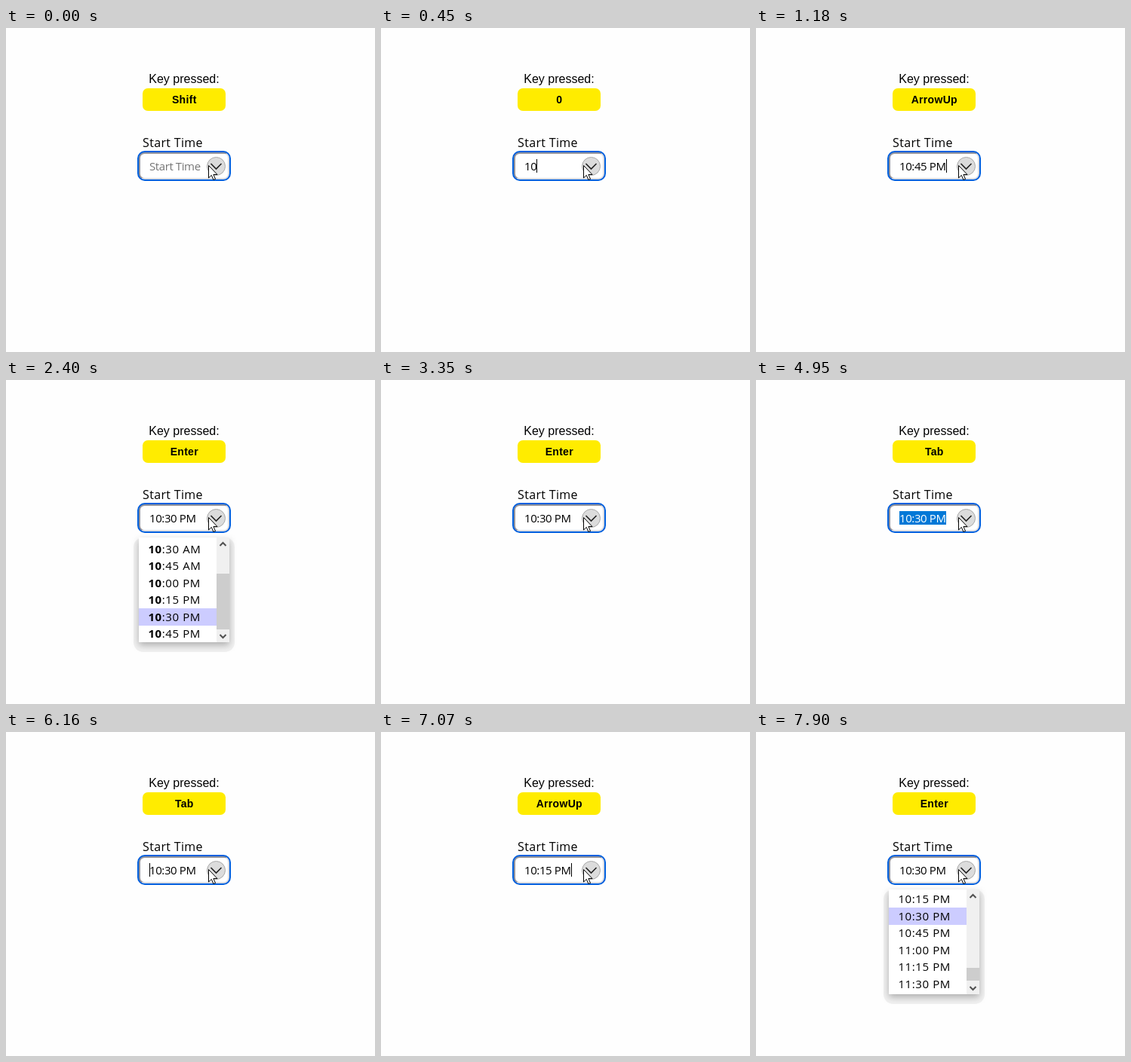
An HTML page for the animation above (8 s loop, 489 by 430 pixels).

```html
<!DOCTYPE html>
<html lang="en">
<head>
<meta charset="utf-8">
<title>Time picker keyboard demo</title>
<style>
  html, body { margin: 0; width: 100%; height: 100%; overflow: hidden; background: #fefefe; }
  svg { display: block; }
  text { font-family: "Open Sans", "Noto Sans", sans-serif; white-space: pre; }
  .sans { font-family: "Liberation Sans", Arial, sans-serif; text-anchor: middle; }
  #key { font-size: 14px; font-weight: bold; letter-spacing: .3px; }
  #value { font-size: 15px; letter-spacing: -.4px; }
  #rows { font-size: 15px; font-weight: 500; letter-spacing: .6px; }
  #panel { filter: drop-shadow(0 4px 5px rgba(0, 0, 0, .28)); }
  .line { fill: none; stroke: #505050; stroke-width: 2; }
</style>
</head>
<body>
<svg width="489" height="430" viewBox="0 0 489 430">
  <defs>
    <linearGradient id="inset" x1="0" y1="0" x2="1" y2="1">
      <stop offset=".5" stop-color="#94949c"/>
      <stop offset=".5" stop-color="#dedee2"/>
    </linearGradient>
    <clipPath id="view"><rect x="176" y="209" width="103" height="139"/></clipPath>
  </defs>

  <text class="sans" x="236" y="73" font-size="16">Key pressed:</text>
  <rect x="181" y="80" width="110" height="30" rx="7" fill="#ffec00"/>
  <text id="key" class="sans" x="236.3" y="100"></text>

  <text x="181" y="158" font-size="16" font-weight="500" letter-spacing=".35">Start Time</text>
  <rect x="176.5" y="165.5" width="119" height="35" rx="7" fill="#fff" stroke="url(#inset)" stroke-width="3"/>
  <rect id="ring" x="175" y="164" width="122" height="38" rx="9" fill="none" stroke="#0060df" stroke-width="2"/>
  <rect id="selection" x="190" y="174" width="62" height="18" fill="#0078d7"/>
  <text id="value" x="190" y="189"></text>
  <rect id="caret" y="174" width="1" height="18"/>
  <circle cx="278.5" cy="183.5" r="12" fill="#dcdcdc" stroke="#a9a9a9"/>
  <path class="line" style="stroke:#222;stroke-width:1.6" d="M271.5 180l7 7 7-7"/>

  <g id="list">
    <rect x="169" y="209" width="134" height="152" rx="13" fill="#f1f1f1"/>
    <rect id="panel" x="176" y="209" width="120" height="139" fill="#fff"/>
    <g id="rows" clip-path="url(#view)"></g>
    <rect x="279" y="209" width="17" height="139" fill="#f0f0f0"/>
    <rect id="thumb" x="279" width="17" fill="#cdcdcd"/>
    <path class="line" d="M283.5 220l4-4 4 4M283.5 338l4 4 4-4"/>
  </g>

  <path d="M268.5 182.5v16.5l3.8-3.6 2.6 6.1 2.6-1.1-2.6-5.9h5.1z" fill="#fff" stroke="#000"/>
</svg>
<script>
const LOOP = 8000, ROW = 22.5;
const $ = id => document.getElementById(id);

// thumb: top and height of the scroll handle
const filtered = {
  rows: ['10:30 AM', '10:45 AM', '10:00 PM', '10:15 PM', '10:30 PM', '10:45 PM'],
  top: 213.3, bold: 2, thumb: [257, 74]
};
const full = {
  rows: ['10:15 PM', '10:30 PM', '10:45 PM', '11:00 PM', '11:15 PM', '11:30 PM'],
  top: 210.8, bold: 0, thumb: [313, 17]
};

// Each step changes part of the state; caret is an x position, 0 hides it.
const steps = [
  [0, { key: 'Shift', value: '', caret: 0, focus: true, selected: false, list: null }],
  [120, { value: '1', caret: 198 }],
  [270, { key: '1' }],
  [360, { value: '10', caret: 206 }],
  [450, { key: '0' }],
  [880, { caret: 0 }],
  [1000, { caret: 190 }],
  [1180, { key: 'ArrowUp', value: '10:45 PM', caret: 252 }],
  [1300, { caret: 190 }],
  [1420, { value: '10:30 PM', caret: 252 }],
  [1910, { caret: 0 }],
  [2400, { key: 'Enter', list: filtered }],
  [2460, { caret: 252 }],
  [2920, { caret: 0 }],
  [3350, { list: null }],
  [3520, { focus: false }],
  [3700, { key: 'Tab' }],
  [4950, { focus: true, selected: true }],
  [6160, { selected: false, caret: 190 }],
  [6320, { key: 'ArrowUp', value: '10:15 PM', caret: 252 }],
  [6570, { caret: 0 }],
  [7070, { caret: 252 }],
  [7330, { key: 'ArrowDown', value: '10:30 PM' }],
  [7650, { caret: 0 }],
  [7900, { key: 'Enter', list: full }]
];

const show = (id, on) => $(id).setAttribute('visibility', on ? 'visible' : 'hidden');

function drawList({ rows, top, bold, thumb }, value) {
  $('rows').innerHTML = rows.map((time, i) => {
    const y = top + i * ROW;
    const mark = time === value
      ? `<rect x="176" y="${Math.floor(y)}" width="103" height="23" fill="#ccccff"/>` : '';
    return `${mark}<text x="188.4" y="${Math.round(y + 16.5)}">` +
      `<tspan font-weight="bold">${time.slice(0, bold)}</tspan>${time.slice(bold)}</text>`;
  }).join('');
  $('thumb').setAttribute('y', thumb[0]);
  $('thumb').setAttribute('height', thumb[1]);
}

function draw(s) {
  $('key').textContent = s.key;
  $('value').textContent = s.value || 'Start Time';
  $('value').setAttribute('fill', s.selected ? '#fff' : s.value ? '#000' : '#757575');
  $('caret').setAttribute('x', s.caret);
  show('caret', s.caret);
  show('ring', s.focus);
  show('selection', s.selected);
  show('list', s.list);
  if (s.list) drawList(s.list, s.value);
}

let last = -1;
const start = performance.now();
function tick() {
  const t = Math.max(0, performance.now() - start) % LOOP;
  const past = steps.filter(([at]) => at <= t);
  if (past.length !== last) {
    last = past.length;
    draw(Object.assign({}, ...past.map(([, change]) => change)));
  }
  requestAnimationFrame(tick);
}
tick();
</script>
</body>
</html>
```
